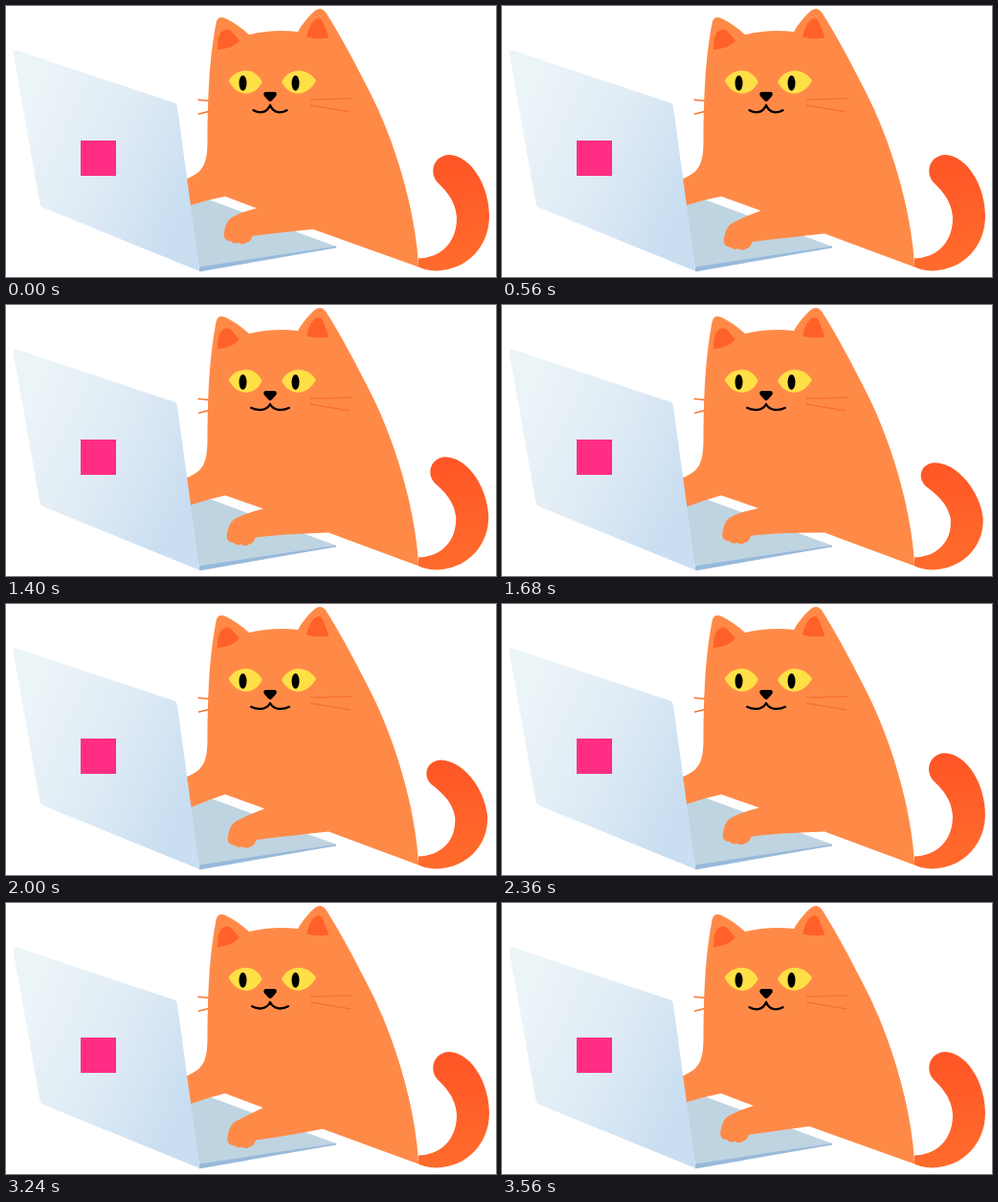
An HTML page for the animation above (3.6 s loop, 512 px wide and 284 px high).

```html
<!DOCTYPE html>
<html lang="en">
<head>
<meta charset="utf-8">
<title>Cat typing on a laptop</title>
<style>
html, body { margin: 0; width: 100%; height: 100%; overflow: hidden; background: #fff; }
svg { display: block; width: 100vw; height: 100vh; }
</style>
</head>
<body>
<svg viewBox="0 0 512 284">
  <defs>
    <linearGradient id="lid" gradientUnits="userSpaceOnUse" x1="22" y1="110" x2="196" y2="190">
      <stop offset="0" stop-color="#ebf4f7"/>
      <stop offset=".5" stop-color="#dfebf5"/>
      <stop offset="1" stop-color="#c9def1"/>
    </linearGradient>
    <linearGradient id="fur" gradientUnits="userSpaceOnUse" x1="460" y1="156" x2="470" y2="278">
      <stop offset="0" stop-color="#ff5526"/>
      <stop offset="1" stop-color="#ff6c2c"/>
    </linearGradient>
  </defs>

  <path fill="#bfd4e1" d="M186 193.300L345 252L202 274.500Z"/>
  <path fill="#98b9da" d="M202 273.500L345 251.800V253.400L202 278.500Z"/>

  <path id="tail" fill="url(#fur)"/>
  <path id="body" fill="#ff8a48"/>

  <g fill="#ff6129">
    <path d="M221 46C221 34 223 27 229 24.500Q232 23.500 235 26L244 36Q238 44 221 46Z"/>
    <path d="M314 32.500C316 23 320 15 325.500 13Q329 12.500 331 16L337.500 33.500Q325 35.500 314 32.500Z"/>
  </g>

  <g fill="#ffe047">
    <path d="M232.500 78C242 64 260 64 267.500 79.500C260 96 241 96 232.500 78Z"/>
    <path d="M324 78C314 64 296 64 288 79.500C296 96 315 96 324 78Z"/>
  </g>
  <ellipse cx="247.500" cy="80.800" rx="4" ry="8"/>
  <ellipse cx="302.500" cy="80.800" rx="4" ry="8"/>
  <path d="M271 90H281Q284 91 282 94.500L278 99Q276 101 274 99L270 94.500Q268 91 271 90Z"/>
  <path id="mouth" fill="none" stroke="#000" stroke-width="2.300" stroke-linecap="round"/>
  <path fill="none" stroke="#f6742f" stroke-width="1.500" d="M318 98L361 97M318 104L360 111M200.500 98.300L212 99.500M201 113.300L212 110.500"/>

  <path fill="url(#lid)" d="M7.500 49Q8 45.500 12 46.800L175 101.300Q178.500 102.500 179 106L202.300 278L39.500 211.500Q36 210 35.300 206.500Z"/>
  <rect x="78" y="141" width="37" height="37" fill="#ff2d83"/>
</svg>
<script>
const LOOP = 3600, TAP = 240;
const tail = document.getElementById('tail');
const body = document.getElementById('body');
const mouth = document.getElementById('mouth');

const ease = (t, a, b) => {
  const k = Math.min(1, Math.max(0, (t - a) / (b - a)));
  return k * k * (3 - 2 * k);
};
const pulse = (t, a, b) => t < a || t > b ? 0 : Math.sin(Math.PI * (t - a) / (b - a)) ** 2;
const hold = (t, a, b) => ease(t, a, a + 480) * (1 - ease(t, b, b + 480));
const pt = (x, y) => x.toFixed(2) + ' ' + y.toFixed(2) + ' ';

function drawBody(lean, tap, left) {
  const dx = 2.5 * lean + 2 * tap, dy = lean + 7 * tap;
  const paw = (x, y) => pt(x + dx, y + dy);
  const gap = pt(262 + 6 * lean + 3 * tap, 212 + lean + 2 * tap);
  body.setAttribute('d',
    'M431 273.500C429 222 410 150 382 94C366 62 350 32 335 8Q329 -1 321 6.500Q311 16 305 27' +
    'Q279 24 254 30Q242 19 230 13.200Q221 9.500 219.500 18C213 53 211 86 210.500 140' +
    'C210.500 166 206 174 189 181L184 185L185 ' + (211 + left) +
    'L' + pt(192, 209 + left) + 'Q' + pt(211, 203 + left * .55) + '229 199.500' +
    'L' + gap + 'Q' + paw(246, 216) + paw(237, 221) +
    'C' + paw(231, 224) + paw(229, 231) + paw(228, 237) +
    'C' + paw(226.5, 244) + paw(231, 246.5) + paw(235, 246.5) +
    'Q' + paw(238, 250) + paw(243, 248) +
    'Q' + paw(247, 251) + paw(251, 248) +
    'Q' + paw(255.5, 247.5) + paw(257.5, 241) +
    'Q' + paw(285, 237.5) + pt(321 + 16 * lean, 234 + 4.6 * lean) + 'Z');
}

function drawTail(sway) {
  // the bend grows from the fixed root to the tip
  const p = (x, y) => {
    const w = Math.min(1, Math.max(0, (262 - y) / 98)) ** 1.7 * sway;
    return pt(x - 11 * w, y + 10 * w);
  };
  tail.setAttribute('d',
    'M' + p(431, 264.5) +
    'C' + p(452, 264) + p(471, 250) + p(471, 222) +
    'C' + p(470, 203) + p(458, 192) + p(450, 184) +
    'C' + p(441, 172) + p(449, 156) + p(463, 156) +
    'C' + p(487, 157) + p(505, 190) + p(505, 220) +
    'C' + p(505, 253) + p(480, 278) + p(448, 277.5) +
    'Q' + p(438, 277) + p(431, 273.5) + 'Z');
}

function drawMouth(smile) {
  const w = 17.5 + 2.3 * smile, y = 109.3 - 1.6 * smile;
  const side = s => 'M' + pt(276 + s * w, y) +
    'C' + pt(276 + s * (w - 6), y + 3.3) + pt(276 + s * 4, y + 3.6) + '276 104';
  mouth.setAttribute('d', side(-1) + side(1));
}

function draw(t) {
  const phase = 2 * Math.PI * t / TAP;
  const lean = hold(t, 0, 3040), smile = hold(t, 620, 3040);
  drawBody(lean, (1 - Math.cos(phase)) / 2, smile * (2.7 + 2.1 * Math.sin(phase)));
  drawTail(pulse(t, 1160, 2420));
  drawMouth(smile);
}

const start = performance.now();
function tick() {
  draw((performance.now() - start) % LOOP);
  requestAnimationFrame(tick);
}
tick();
</script>
</body>
</html>
```
